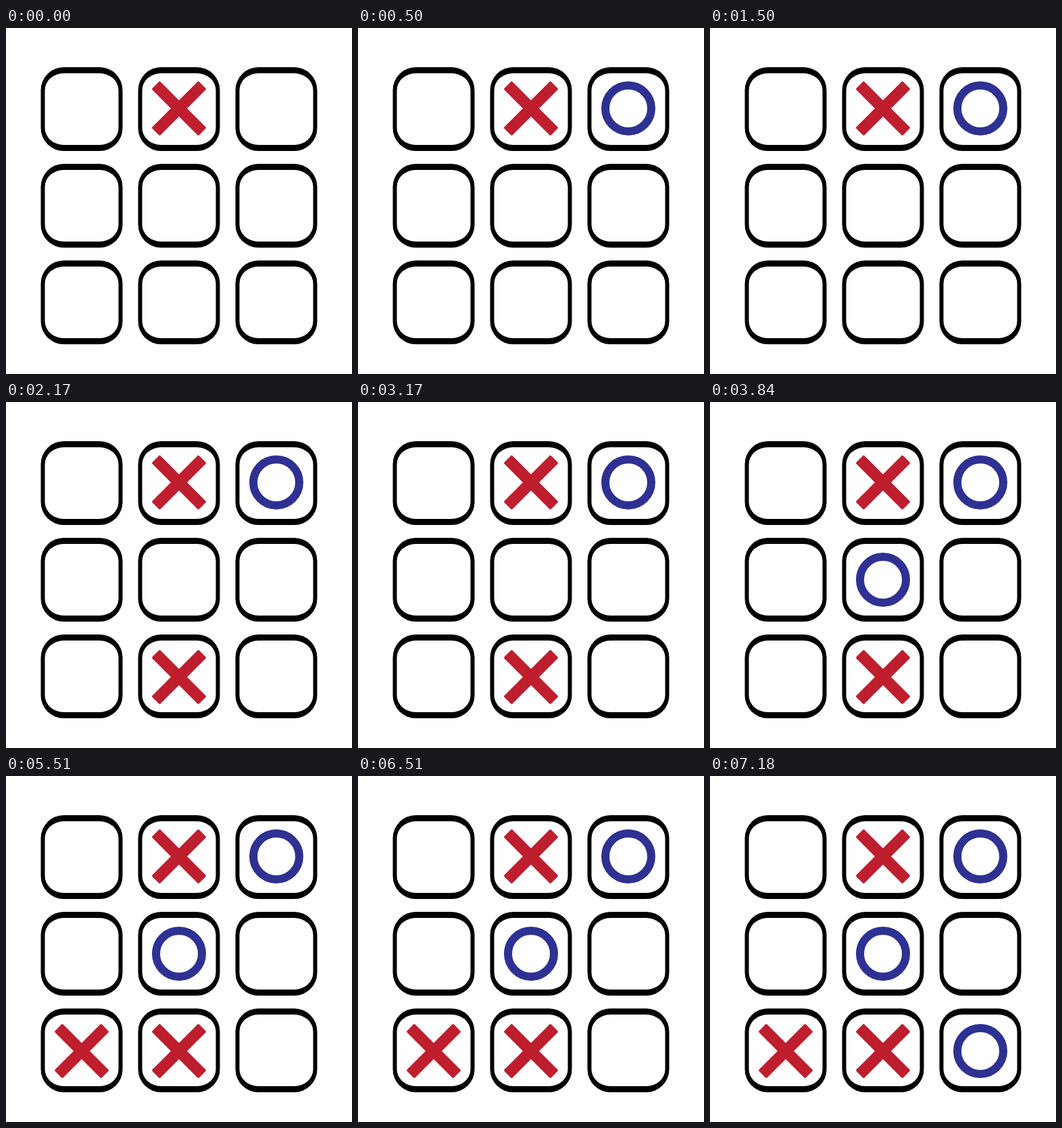
These frames come from a looping animation (512 by 512 pixels, 8000 ms). An HTML page:

```html
<!DOCTYPE html>
<html lang="en">
<head>
<meta charset="utf-8">
<title>Noughts and crosses</title>
<style>
  html, body { margin: 0; width: 100%; height: 100%; overflow: hidden; background: #fff; }
  svg { display: block; width: 100%; height: 100%; }
</style>
</head>
<body>
<svg viewBox="0 0 512 512">
  <defs>
    <g id="cell">
      <rect width="121" height="124" rx="34"/>
      <rect x="6" y="9" width="109" height="106" rx="28" ry="25" fill="#fff"/>
    </g>
    <g id="x" fill="#be1e2d">
      <rect x="-49" y="-8.5" width="98" height="17" rx="2" transform="rotate(45)"/>
      <rect x="-49" y="-8.5" width="98" height="17" rx="2" transform="rotate(-45)"/>
    </g>
    <circle id="o" r="34" fill="none" stroke="#2e3192" stroke-width="12"/>
  </defs>
</svg>
<script>
const LOOP = 8000, FIRST = 500, STEP = 1670;
const svg = document.querySelector('svg');

function place(id, x, y) {
  const use = document.createElementNS('http://www.w3.org/2000/svg', 'use');
  use.setAttribute('href', '#' + id);
  use.setAttribute('transform', `translate(${x} ${y})`);
  return svg.appendChild(use);
}

for (let i = 0; i < 9; i++) {
  place('cell', 51.5 + 144 * (i % 3), 58 + 143 * Math.floor(i / 3));
}

// Moves in playing order as [column, row]; crosses begin.
const moves = [[1, 0], [2, 0], [1, 2], [1, 1], [0, 2], [2, 2]];
const marks = moves.map(([col, row], i) =>
  place(i % 2 ? 'o' : 'x', 112 + 144 * col, 119 + 144 * row));

function draw(now) {
  const t = now % LOOP;
  const last = Math.floor((t - FIRST) / STEP) + 1;
  marks.forEach((mark, i) => {
    mark.style.display = i <= last ? '' : 'none';
  });
}

const start = performance.now();
function tick() {
  draw(performance.now() - start);
  requestAnimationFrame(tick);
}
tick();
</script>
</body>
</html>
```
